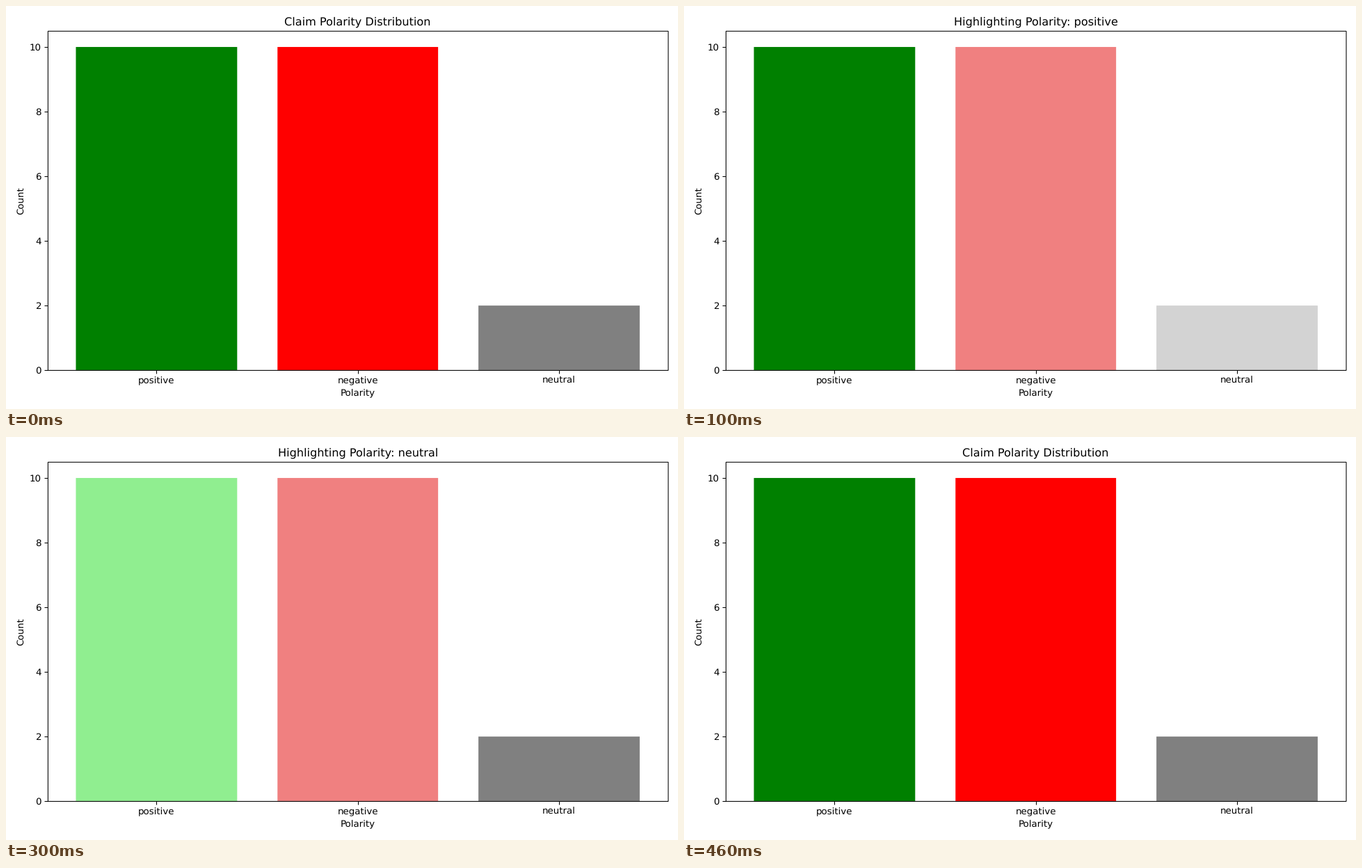
Write a matplotlib script that moves like this. It is 966 by 580 pixels and loops after 0.5 s.

```python
import numpy as np
import matplotlib.pyplot as plt
from matplotlib.animation import FuncAnimation
from matplotlib.patches import Rectangle
from matplotlib.transforms import Affine2D

W, H, DPI = 966, 580, 96

# Plot area in a 1000 x 600 layout, which is scaled down to the stage.
LAYOUT_W, LAYOUT_H = 1000, 600
LEFT, RIGHT, TOP, BOTTOM = 62, 985, 37, 542
X_MIN, X_MAX, Y_MAX = -0.54, 2.54, 10.5
BAR_WIDTH = 0.8

LABELS = ["positive", "negative", "neutral"]
COUNTS = [10, 10, 2]
STRONG = ["green", "red", "gray"]
PALE = ["lightgreen", "lightcoral", "lightgray"]

plt.rcParams.update({"font.family": "DejaVu Sans", "font.size": 10.06,
                     "text.hinting": "none"})


def to_grid(value, start, unit):
    """Round a data value to whole layout units."""
    return np.round((np.asarray(value) - start) * unit) / unit + start


fig = plt.figure(figsize=(W / DPI, H / DPI), dpi=DPI, facecolor="white")
ax = fig.add_axes([LEFT / LAYOUT_W, 1 - BOTTOM / LAYOUT_H,
                   (RIGHT - LEFT) / LAYOUT_W, (BOTTOM - TOP) / LAYOUT_H])
ax.set_xlim(X_MIN, X_MAX)
ax.set_ylim(0, Y_MAX)
ax.set_xlabel("Polarity")
ax.set_ylabel("Count")
title = ax.set_title("Claim Polarity Distribution")

x_unit = (RIGHT - LEFT) / (X_MAX - X_MIN)
y_unit = (BOTTOM - TOP) / Y_MAX
slots = np.arange(len(LABELS))
starts = to_grid(slots - BAR_WIDTH / 2, X_MIN, x_unit)
ends = to_grid(slots + BAR_WIDTH / 2, X_MIN, x_unit)
bars = ax.bar(starts, to_grid(COUNTS, 0, y_unit), ends - starts,
              align="edge", color=STRONG, snap=False)
ax.set_xticks(slots, LABELS)

# The frame line runs through pixel centres, half a pixel off the plot edge.
ax.spines[:].set_visible(False)
half_pixel = Affine2D().translate(0.5 * W / LAYOUT_W, -0.5 * H / LAYOUT_H)
ax.add_artist(Rectangle((0, 0), 1, 1, fill=False, edgecolor="black", lw=0.8,
                        transform=ax.transAxes + half_pixel,
                        snap=False, clip_on=False, zorder=2.5))


def update(step):
    """Overview first and last, with each bar highlighted in between."""
    chosen = step - 1
    overview = not 0 <= chosen < len(LABELS)
    for i, bar in enumerate(bars):
        bar.set_facecolor(STRONG[i] if overview or i == chosen else PALE[i])
    if overview:
        title.set_text("Claim Polarity Distribution")
    else:
        title.set_text(f"Highlighting Polarity: {LABELS[chosen]}")
    return [*bars, title]


anim = FuncAnimation(fig, update, frames=len(LABELS) + 2, interval=100,
                     repeat=True, repeat_delay=0, blit=False)
plt.show()
```
